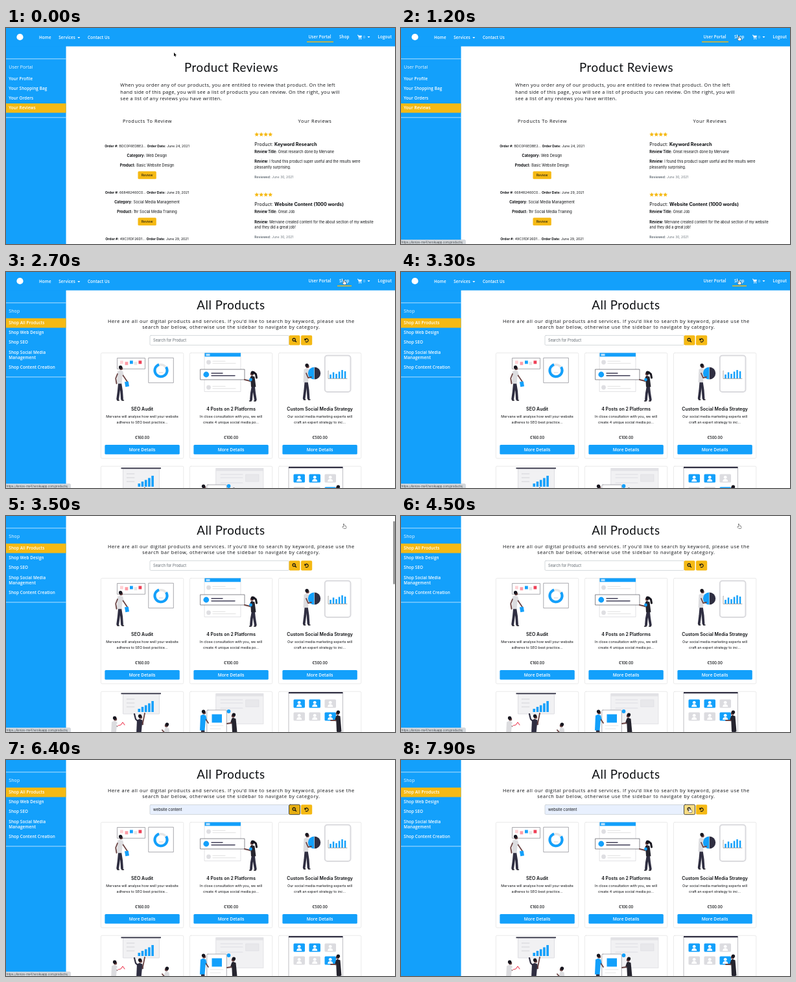
An HTML page with a canvas that plays this animation: 600x335 px, repeating every 8 s.

```html
<!DOCTYPE html>
<html lang="en">
<head>
<meta charset="utf-8">
<title>Shop walkthrough</title>
<style>
html, body { margin: 0; width: 100%; height: 100%; overflow: hidden; background: #fff; }
canvas { display: block; width: 600px; height: 335px; }
</style>
</head>
<body>
<canvas id="stage" width="600" height="335"></canvas>
<script>
const ctx = document.getElementById('stage').getContext('2d');
const LOOP = 8000, K = 10;
const BLUE = '#13a0fb', GOLD = '#f5b914', INK = '#0c0e11', NAVY = '#2f2e41', SLATE = '#3f3d56';
const PALE = '#e6e6e6', EDGE = '#c6c6cc', SKIN = '#6b4444', HAIR = '#17161f';
const UI = 'Inter, "Liberation Sans", sans-serif';
const SANS = '"Open Sans", "Noto Sans", sans-serif';
const ROUND = 'Lato, "Open Sans", sans-serif';
const BRAND = 'Mervane';

// ---- drawing helpers ----
function setFont(size, o) {
  ctx.font = `${o.weight || 400} ${size * K}px ${o.font || UI}`;
  ctx.letterSpacing = (o.gap || 0) * K + 'px';
}
// Type is laid out large and scaled down for accurate spacing.
function text(s, x, y, size, o = {}) {
  ctx.save();
  ctx.translate(x, y);
  ctx.scale(1 / K, 1 / K);
  setFont(size, o);
  ctx.textAlign = o.align || 'left';
  ctx.fillStyle = o.color || INK;
  ctx.fillText(s, 0, 0);
  const w = ctx.measureText(s).width / K;
  ctx.restore();
  return w;
}
function measure(s, size, o = {}) {
  ctx.save();
  setFont(size, o);
  const w = ctx.measureText(s).width / K;
  ctx.restore();
  return w;
}
const mid = (s, x, y, size, o = {}) => text(s, x, y, size, { ...o, align: 'center' });

// Parts alternate bold, regular, bold, ...
function rich(parts, x, y, size, centred, color) {
  const opt = i => ({ weight: i % 2 ? 400 : 700, color });
  if (centred) x -= parts.reduce((w, s, i) => w + measure(s, size, opt(i)), 0) / 2;
  parts.forEach((s, i) => { x += text(s, x, y, size, opt(i)); });
}
function box(x, y, w, h, fill, edge, r = 0, lw = 0.7) {
  ctx.beginPath();
  ctx.roundRect(x, y, w, h, r);
  if (fill) { ctx.fillStyle = fill; ctx.fill(); }
  if (edge) { ctx.strokeStyle = edge; ctx.lineWidth = lw; ctx.stroke(); }
}
function dot(x, y, r, c) {
  ctx.beginPath();
  ctx.arc(x, y, r, 0, 7);
  ctx.fillStyle = c;
  ctx.fill();
}
function trace(pts) {
  ctx.beginPath();
  for (let i = 0; i < pts.length; i += 2) ctx.lineTo(pts[i], pts[i + 1]);
}
function poly(c, ...pts) {
  trace(pts);
  ctx.closePath();
  ctx.fillStyle = c;
  ctx.fill();
}
function line(c, w, ...pts) {
  trace(pts);
  ctx.strokeStyle = c;
  ctx.lineWidth = w;
  ctx.lineCap = ctx.lineJoin = 'round';
  ctx.stroke();
}
function ring(x, y, r, w, a, b, c) {
  ctx.beginPath();
  ctx.arc(x, y, r, a, b);
  ctx.strokeStyle = c;
  ctx.lineWidth = w;
  ctx.lineCap = 'butt';
  ctx.stroke();
}
function star(x, y, r) {
  const pts = [];
  for (let i = 0; i < 10; i++) {
    const a = i * Math.PI / 5 - Math.PI / 2, q = i % 2 ? r * 0.48 : r;
    pts.push(x + q * Math.cos(a), y + q * Math.sin(a));
  }
  poly(GOLD, ...pts);
}
const caret = (x, y) => poly('#fff', x, y, x + 4, y, x + 2, y + 2.2);

// ---- shared page parts ----
const navOpt = { font: SANS, weight: 600, color: '#fff', gap: 0.1 };
function frame(title, items, active, rule, line1, line2) {
  box(0, 0, 92.6, 400, BLUE);
  box(0, 0, 600, 28.6, BLUE);
  dot(21.5, 14, 5.1, '#fff');
  text('Home', 51, 17, 6.3, navOpt);
  text('Services', 81.3, 17, 6.3, navOpt);
  caret(110.3, 14);
  text('Contact Us', 126, 17, 6.3, navOpt);
  text('User Portal', 466.5, 16, 6.3, navOpt);
  text('Shop', 514, 16, 6.3, navOpt);
  line('#fff', 0.9, 542, 11.2, 543.3, 11.2, 544.4, 15.2, 548, 15.2);
  poly('#fff', 543.6, 11.8, 549, 11.8, 548.2, 14.5, 544.3, 14.5);
  dot(544.8, 17, 0.8, '#fff');
  dot(547.6, 17, 0.8, '#fff');
  text('0', 551, 16, 5.4, { font: SANS, color: '#d5edff' });
  caret(557.5, 13);
  text('Logout', 573.5, 16, 6.3, navOpt);
  box(line1, 20.8, line2 - line1, 1.5, GOLD);

  const soft = 'rgba(255,255,255,.45)';
  box(0, 47, 92.6, 1.5, soft);
  box(0, rule, 92.6, 1.5, soft);
  text(title, 4.3, 62.8, 7, { font: SANS, color: '#f0f9ff', gap: 0.08 });
  box(0, active, 92.6, 14.6, GOLD);
  items.forEach(([s, y]) => text(s, 4.3, y, 6.35, navOpt));
}

// ---- portal page ----
const orders = [
  ['BDC0F6EDBE2', 'June 24, 2021', 'Web Design', 'Basic Website Design'],
  ['668482460C0', 'June 29, 2021', 'Social Media Management', '1hr Social Media Training'],
  ['49C31DF26D1', 'June 29, 2021', '', '']
];
const reviews = [
  ['Keyword Research', `Great research done by ${BRAND}`,
    'I found this product super useful and the results were', 'pleasantly surprising.'],
  ['Website Content (1000 words)', 'Great Job',
    `${BRAND} created content for the about section of my website`, 'and they did a great job!']
];
function portal() {
  frame('User Portal', [['Your Profile', 81], ['Your Shopping Bag', 96], ['Your Orders', 111],
    ['Your Reviews', 126.2]], 117, 138, 464, 505);
  mid('Product Reviews', 347.5, 67.5, 18.8, { font: ROUND, gap: 0.5 });
  const lead = { font: SANS, gap: 0.34 };
  text('When you order any of our products, you are entitled to review that product. On the left', 176.3, 91.3, 7.4, lead);
  text('hand side of this page, you will see a list of products you can review. On the right, you will', 176.3, 101.8, 7.4, lead);
  text('see a list of any reviews you have written.', 176.3, 112.4, 7.4, lead);
  const head = { font: SANS, gap: 0.55 };
  mid('Products To Review', 218, 146.6, 7.4, head);
  mid('Your Reviews', 476.5, 146.6, 7.4, head);
  orders.forEach(([id, date, cat, name], i) => {
    const y = 72 * i;
    rich(['Order #:', ` ${id}... `, 'Order Date:', ` ${date}`], 217.5, 185.3 + y, 5.2, true);
    rich(['Category:', ' ' + cat], 217.5, 200.2 + y, 5.7, true);
    rich(['Product:', ' ' + name], 217.5, 215.2 + y, 5.7, true);
    box(203.5, 222.3 + y, 28.3, 12, GOLD, null, 1.5);
    mid('Review', 217.6, 230.2 + y, 5.2);
  });
  reviews.forEach(([name, title, a, b], i) => {
    const y = 93.4 * i;
    for (let k = 0; k < 4; k++) star(386.7 + 7 * k, 165.2 + y, 3.6);
    rich(['', 'Product: ', name], 383.3, 182.6 + y, 7.2);
    rich(['Review Title:', ' ' + title], 383.3, 194 + y, 5.55);
    rich(['Review:', ' ' + a], 383.3, 209.2 + y, 5.55);
    text(b, 383.3, 217.8 + y, 5.55);
    rich(['Reviewed:', ' June 30, 2021'], 383.3, 233 + y, 5, false, '#6c757d');
  });
}

// ---- shop illustrations ----
// x, y is the head; the figure stands on foot and bends one arm to the hand point.
function person(x, y, foot, dir, top, legs, hx, hy) {
  const hip = y + (foot - y) * 0.45, s = dir * 2, ex = x + s * 1.8, ey = y + 12;
  line(legs, 3.8, x - s, hip + 1, x - s * 1.6, (hip + foot) / 2, x - s * 2.4, foot - 2);
  line(legs, 3.8, x - s * 0.4, hip + 1, x + s * 0.6, (hip + foot) / 2, x + s, foot - 2);
  line(HAIR, 1.6, x - s * 2.5, foot, x - s * 1.4, foot);
  line(HAIR, 1.6, x + s, foot, x + s * 2.2, foot);
  poly(top, x - 4 - s / 2, y + 5.5, x - 1, y + 3.8, x + 3.5, y + 5.5, x + 3.5 - s, hip + 2, x - 4 - s, hip + 2);
  line(top, 2.6, x + s, y + 7, ex, ey);
  line(SKIN, 1.8, ex, ey, hx, hy);
  dot(x + dir * 0.6, y + 1, 2.6, SKIN);
  dot(x - dir * 0.4, y - 0.8, 2.7, HAIR);
}
function bars(x, base, w, step, hs) {
  hs.forEach((h, i) => box(x + i * step, base - h, w, h, BLUE));
}
function audit() {
  box(171.5, 133.5, 43, 16.8, '#fff', '#85858c');
  [[176, '#ffd0d4'], [183.5, '#ff9ba5'], [191, BLUE], [197.5, PALE], [204.5, '#ee4057']]
    .forEach(([x, c], i) => box(x, 137.5 + (i % 2) * 1.8, 4.8, 5, c));
  box(219.8, 133.2, 38.5, 38.6, '#fff', '#85858c');
  ring(239, 152.7, 9, 3.4, 0, 7, PALE);
  ring(239, 152.7, 9.6, 4, -0.6, 4.4, BLUE);
  line(EDGE, 0.8, 236, 156, 242, 156);
  person(177, 148.5, 199, 1, '#dcdcdf', NAVY, 187, 170);
  line(SKIN, 1.8, 172, 158, 169.2, 165, 170.5, 173);
  poly(BLUE, 183, 170.5, 188.8, 169.8, 190, 177.3, 184.3, 178.2);
}
function posts() {
  box(306.5, 125.5, 55.5, 60, '#fff', '#d6d6da');
  box(306.5, 125.5, 55.5, 5.8, BLUE);
  box(308.5, 126.8, 6, 3.4, '#b9e1fd');
  [140, 179].forEach(y => {
    dot(312.5, y, 3.4, '#dedee2');
    line(PALE, 1.3, 319, y - 1.6, 338, y - 1.6);
    line(PALE, 1.3, 319, y + 1.6, 354, y + 1.6);
  });
  box(300, 151, 68, 16, '#fff', '#55555d');
  dot(308.8, 159, 4.4, BLUE);
  line(SLATE, 1.4, 317, 157, 334, 157);
  line(SLATE, 1.4, 317, 160.8, 353, 160.8);
  person(380, 157, 200, -1, '#25242e', NAVY, 368, 167);
  line(HAIR, 3, 382, 155.5, 385.5, 158.5, 386.5, 164);
  dot(377.5, 167, 2.4, BLUE);
}
function strategy() {
  box(491.8, 129.5, 39.7, 56.5, '#fff', '#dadade', 4, 2);
  bars(499.3, 165, 2.5, 4.5, [6, 9.5, 7, 10.5, 13, 11]);
  line('#555', 0.5, 497, 153, 497, 165.4, 526, 165.4);
  person(464.5, 145.5, 198, 1, '#dcdcdf', NAVY, 472, 160);
  ctx.beginPath();
  ctx.arc(475.3, 157, 9.4, Math.PI / 2, Math.PI * 1.5);
  ctx.fillStyle = BLUE;
  ctx.fill();
  ctx.beginPath();
  ctx.arc(475.8, 157, 9.4, -Math.PI / 2, Math.PI / 2);
  ctx.fillStyle = NAVY;
  ctx.fill();
  line(SKIN, 1.8, 463, 157, 466, 164, 471, 163);
}
function board() {
  box(180.5, 305, 56, 31, '#f1f1f3', '#d3d3d8', 0.5);
  box(177.5, 303.6, 61.5, 1.6, NAVY);
  bars(203.5, 333, 3.6, 5.2, [5, 8, 10.5, 13.5, 17]);
  [313, 319, 325].forEach(y => line('#d3d3d8', 1, 186, y, 198, y));
  person(168, 343, 395, 1, '#dcdcdf', NAVY, 176, 352);
  poly('#fff', 170, 352, 181, 346, 185, 354, 175, 360);
  line('#ee4057', 1.1, 173, 354, 177, 353, 180, 349, 183, 353);
  person(207, 340, 395, 1, NAVY, NAVY, 214, 335);
  line(NAVY, 2.2, 204, 348, 200, 344, 198, 336);
  person(248, 353, 395, -1, '#dcdcdf', NAVY, 241, 361);
}
function pages() {
  box(324, 304.5, 73, 47, '#f1f1f3', '#dcdce0');
  box(324, 304.5, 73, 4, '#e2e2e6');
  [314, 319, 327].forEach(y => line('#dedee3', 1.1, 331, y, 365, y));
  box(370, 314, 20, 11, '#e8e8eb', '#dedee3');
  box(309.8, 330, 30.5, 44, '#fff', '#8d8d95', 1.5);
  box(317.5, 336.5, 15.5, 13, BLUE);
  line(PALE, 1.2, 315, 354, 335, 354);
  line(PALE, 1.2, 315, 359, 331, 359);
  person(305, 333, 392, 1, BLUE, NAVY, 312, 350);
  dot(343.5, 332, 2.9, BLUE);
  person(351, 338, 392, -1, '#25242e', NAVY, 341, 351);
}
function team() {
  box(436, 302.5, 83.5, 62, '#fff', '#a4a4ab', 1);
  box(436, 302, 83.5, 2.2, NAVY);
  for (let i = 0; i < 6; i++) {
    const x = 443.5 + (i % 3) * 24, y = i < 3 ? 313.5 : 333.5;
    box(x, y, 17.5, 13, [0, 1, 5].includes(i) ? BLUE : '#dcdce0', null, 1.5);
    dot(x + 8.7, y + 4.8, 2.4, '#fff');
    ctx.beginPath();
    ctx.arc(x + 8.7, y + 11.5, 4, Math.PI, 0);
    ctx.fill();
  }
  person(512, 334, 395, -1, '#25242e', NAVY, 501, 346);
}

// ---- shop page ----
const cards = [
  ['SEO Audit', `${BRAND} will analyse how well your website`, 'adheres to SEO best practice...', '€160.00', audit, board],
  ['4 Posts on 2 Platforms', 'In close consultation with you, we will', 'create 4 unique social media po...', '€100.00', posts, pages],
  ['Custom Social Media Strategy', 'Our social media marketing experts will', 'craft an expert strategy to inc...', '€500.00', strategy, team]
];
const WORD = 'website', PICK = 'website content';

function search(t) {
  const focus = t >= 4900 && t < 6300, filled = t >= 6100;
  const n = t < 5000 ? 0 : Math.min(7, 1 + Math.floor((t - 5000) / 85));
  const value = filled ? PICK : WORD.slice(0, n);
  box(222, 98.4, 214.5, 15, filled ? '#e8f0fe' : '#fff', '#c3c9cf', 1.5);
  if (focus) {
    box(221.6, 98, 215, 15.8, null, 'rgba(70,150,255,.35)', 2, 2.2);
    box(222, 98.4, 214.5, 15, null, '#5da5f5', 1.5, 0.8);
  }
  const w = text(value || 'Search for Product', 227, 108.2, value ? 5.9 : 5.75, { color: value ? INK : '#5f676e' });
  if (focus) box(227.4 + (value ? w : 0), 102.3, 0.6, 7.5, '#222');

  const picked = t >= 6300, hover = t >= 7450;
  box(436.5, 98.2, 17, 15.4, hover ? '#f9dc83' : picked ? '#e6ae12' : GOLD,
    picked ? '#4a4a40' : null, 1.8, 1);
  ring(444.2, 105, 2.1, 1.1, 0, 7, INK);
  line(INK, 1.3, 446, 106.8, 447.6, 108.4);
  box(455, 98.2, 17.2, 15.4, GOLD, null, 1.8);
  ring(463.7, 106, 2.5, 1.1, -2.5, 2.5, INK);
  poly(INK, 460.4, 102.7, 460.4, 106, 463.6, 106);
}
function suggestions(t) {
  if (t < 5000 || t >= 6100) return;
  ctx.save();
  ctx.shadowColor = 'rgba(0,0,0,.3)';
  ctx.shadowBlur = 3;
  ctx.shadowOffsetY = 1;
  box(222, 115, 72.5, 32, '#fff', null, 1);
  ctx.restore();
  if (t >= 5850) box(222, 131.5, 72.5, 12.5, '#e4e6ea');
  text(WORD, 226.5, 126.2, 5, { weight: 500 });
  text(PICK, 226.5, 139.4, 5, { weight: 500 });
}
function shop(t) {
  frame('Shop', [['Shop All Products', 81], ['Shop Web Design', 96], ['Shop SEO', 111],
    ['Shop Social Media', 126.5], ['Management', 135.2], ['Shop Content Creation', 150.3]], 71.8, 162, 511, 533);
  mid('All Products', 347, 58.2, 18.8, { font: ROUND, gap: 0.5 });
  const lead = { font: SANS, gap: 0.58 };
  mid("Here are all our digital products and services. If you'd like to search by keyword, please use the", 347.4, 78.5, 7.4, lead);
  mid('search bar below, otherwise use the sidebar to navigate by category.', 347.4, 87.8, 7.4, lead);
  search(t);
  cards.forEach(([name, a, b, price, art, next], i) => {
    const x = 146.4 + 137 * i, c = x + 63.7;
    box(x, 125.5, 127.4, 163.6, '#fff', '#e1e1e1', 1.8);
    box(x, 301.2, 127.4, 163.6, '#fff', '#e1e1e1', 1.8);
    art();
    next();
    mid(name, c, 214.5, 7, { weight: 600 });
    mid(a, c, 226.2, 5.4);
    mid(b, c, 235, 5.4);
    mid(price, c, 259.2, 5.7, { weight: 500 });
    box(x + 6, 268, 115.4, 14.8, BLUE, null, 1.6);
    mid('More Details', c, 277.8, 6.6, { font: SANS, weight: 600, color: '#fff', gap: 0.05 });
  });
  suggestions(t);
}

// ---- pointer ----
const path = [[0, 259, 38], [300, 259, 38], [950, 520.5, 12.5], [4550, 520.5, 12.5],
  [4850, 300, 75], [7300, 300, 75], [7550, 444.5, 74.5], [LOOP, 444.5, 74.5]];
function pointer(t) {
  const i = path.findIndex(p => p[0] > t) || 1;
  const [t0, x0, y0] = path[i - 1], [t1, x1, y1] = path[i];
  const u = (t - t0) / (t1 - t0), e = u * u * (3 - 2 * u);
  return [x0 + (x1 - x0) * e, y0 + (y1 - y0) * e];
}
function outlined(fill, edge, w, pts) {
  line(edge, w, ...pts, pts[0], pts[1]);
  poly(fill, ...pts);
}
function cursor(t) {
  if (t >= 5000 && t < 7300) return;
  const [x, y] = pointer(t);
  const hand = (x > 508 && y < 24) || x > 437 && y > 65;
  const beam = !hand && t > 4700 && x < 437 && y > 70;
  ctx.save();
  ctx.translate(x, y);
  if (hand) {
    outlined('#fff', '#222', 1, [0, 0.4, 1.1, 0.4, 1.4, 2.8, 3.9, 3.4, 4.3, 4.7, 3.5, 7, 0.6, 7, -1.6, 4.5, -1.1, 3.9, 0, 4.7]);
  } else if (beam) {
    line('#222', 0.7, 0, -1, 0, 7);
    line('#222', 0.6, -1.3, -1.4, 0, -1, 1.3, -1.4);
    line('#222', 0.6, -1.3, 7.4, 0, 7, 1.3, 7.4);
  } else {
    outlined('#111', '#fff', 1, [0, 0, 0, 5.8, 1.3, 4.7, 2.2, 6.7, 3.1, 6.3, 2.2, 4.4, 4, 4.3]);
  }
  ctx.restore();
}

function draw(t) {
  const u = Math.min(1, Math.max(0, (t - 3310) / 180));
  const scroll = 29 * u * (2 - u);
  ctx.fillStyle = '#fff';
  ctx.fillRect(0, 0, 600, 335);
  ctx.save();
  ctx.translate(0, -scroll);
  if (t < 1600) portal(); else shop(t);
  ctx.restore();
  // The link address stays until the pointer moves again.
  if (t >= 1000 && t < 7350) {
    box(-2, 328.6, 101.5, 9, '#d6dade', '#c5c9ce', 1.5, 0.5);
    text('https://lionize-ms4.herokuapp.com/products/', 0.8, 333.7, 4.4, { color: '#3f4347' });
  }
  const bar = u > 0 ? Math.min(1, Math.max(0, (4200 - t) / 300)) : 0;
  if (bar) {
    ctx.globalAlpha = bar;
    box(597.4, 1 + scroll * 0.24, 2.2, 98, '#7f7f7f', null, 1.1);
    ctx.globalAlpha = 1;
  }
  cursor(t);
}

const start = performance.now();
function tick() {
  draw((performance.now() - start) % LOOP);
  requestAnimationFrame(tick);
}
tick();
</script>
</body>
</html>
```
